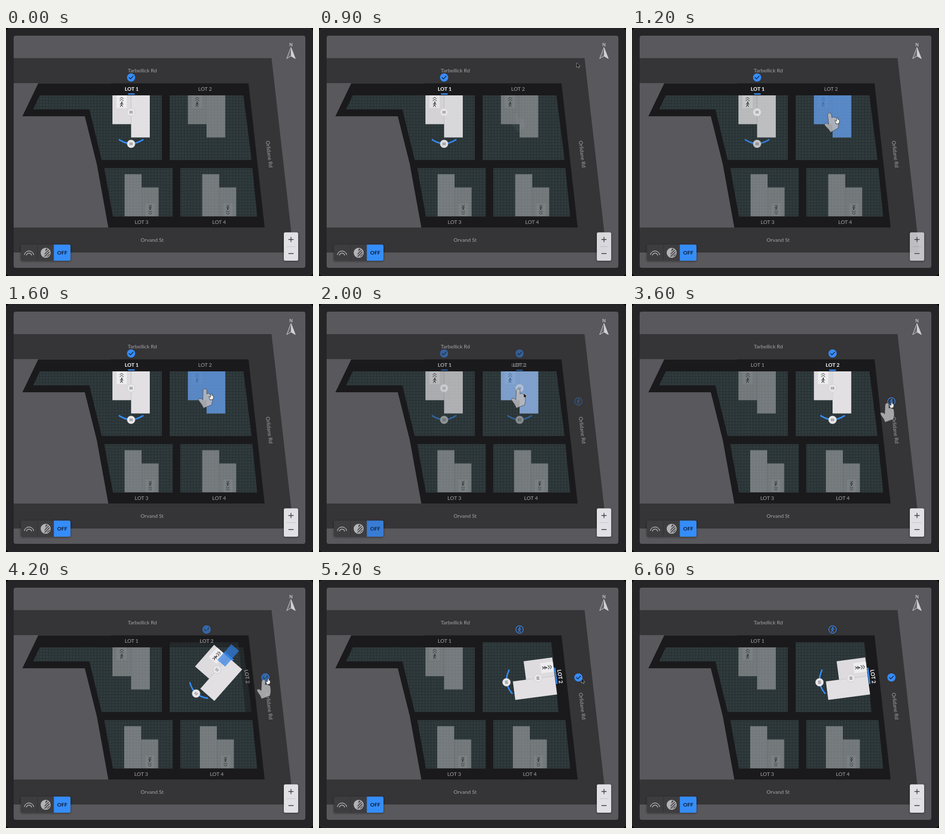
Animation, 600 px wide and 486 px high, one loop 6.7 s. Source, as an HTML page:

```html
<!DOCTYPE html>
<html lang="en">
<head>
<meta charset="utf-8">
<title>Lot planner</title>
<style>
html, body { margin: 0; width: 100%; height: 100%; overflow: hidden; background: #000; }
svg { display: block; }
text { font: 500 10.2px Lato, sans-serif; text-anchor: middle; fill: #9b9a9d; }
.on { fill: #fff; font-weight: 700; }
.lot { fill: url(#grid); }
.line { fill: none; stroke: currentColor; stroke-linecap: round; stroke-linejoin: round; }
</style>
</head>
<body>
<svg width="600" height="486" viewBox="0 0 600 486">
<defs>
  <pattern id="grid" width="5.9" height="5.9" patternUnits="userSpaceOnUse">
    <path d="M0 0H6V6H0Z" fill="#303b3d"/>
    <path d="M0 .5H6M.5 0V6" stroke="#252e30"/>
  </pattern>
  <clipPath id="disc"><circle r="9"/></clipPath>
  <filter id="soft" x="-20%" y="-20%" width="140%" height="150%">
    <feDropShadow dx="0" dy="1" stdDeviation="2" flood-opacity=".45"/>
  </filter>

  <g id="walker">
    <circle cx=".4" cy="-4" r="1.3" fill="currentColor"/>
    <path class="line" stroke-width="1.1" d="M.2-2L-.3 1L2 4.5M-.3 1L-2.6 4.5M-2.8 0L-1.5-1.8L.6-1.8L2.8 0"/>
  </g>

  <!-- origin: middle of the front edge -->
  <g id="house">
    <path d="M-36.5 0H0V56.4H-36.5Z" fill="#dddbde"/>
    <path d="M0 0H36.5V82.4H0Z" fill="#e2e0e3"/>
    <path d="M-28.5 0H-8.5V25H-28.5Z" fill="#edecee"/>
    <path d="M0 0V56" stroke="#c9c7ca" stroke-width=".7"/>
    <g color="#29292b">
      <use href="#walker" x="-18.5" y="17.5"/>
      <path class="line" d="M-22 6.5l3.5-2.7l3.5 2.7m-7 4l3.5-2.7l3.5 2.7"/>
    </g>
  </g>

  <g id="knob">
    <circle r="7.8" fill="#e9e8eb" stroke="#c2c0c4" stroke-width=".6"/>
    <path d="M-2.3-2.7V2.7M0-2.7V2.7M2.3-2.7V2.7" stroke="#59585b" stroke-width=".9"/>
  </g>
  <g id="controls">
    <use href="#knob" y="33"/>
    <path class="line" color="#368dfa" stroke-width="2.8" d="M-23 87Q0 102 23 87"/>
    <use href="#knob" y="95"/>
  </g>

  <g id="check">
    <circle r="8" fill="#368dfa"/>
    <path class="line" color="#10233f" stroke-width="1.4" d="M-4 0L-1.2 2.8L4-2.8"/>
  </g>
  <g id="ring" color="#368dfa">
    <circle r="7.3" class="line" stroke-width="1.3"/>
    <use href="#walker" transform="translate(0 .2)"/>
  </g>

  <path id="handShape" d="M-4 1Q0-4 3 0Q4 3 2 9Q6 7 8 11Q12 11 11 17Q11 25 7 32L-10 35Q-11 28-15 21Q-18 14-13 15Q-9 16-8 19Z"/>
</defs>

<rect width="600" height="486" rx="7" fill="#252427"/>
<rect x="15" y="15" width="570" height="455" rx="4" fill="#59585c"/>
<path fill="#353437" d="M15 59H519L562 440H15Z"/>
<path fill="#59585c" d="M15 108H205V391H15Z"/>
<path fill="#1a191b" d="M63 108.5H474L505.5 391H200L177.5 267L154 173H32Z"/>

<path class="lot" d="M66 132H304.5V258.5H187L163 159.5H53Z"/>
<path class="lot" d="M320 132H455L468 258.5H320Z"/>
<path class="lot" id="wide" d="M320 132H464L480 258.5H320Z"/>
<path class="lot" id="tall" d="M320 122H454L468 258.5H320Z"/>
<path class="lot" d="M192 274.5H326V369.5H209Z"/>
<path class="lot" d="M340.5 274.5H481.5L491 369.5H340.5Z"/>

<text x="266.5" y="87">Tarbellick Rd</text>
<text x="285.5" y="419">Orvand St</text>
<text transform="translate(511 247.5) rotate(83)">Orlidane Rd</text>

<use href="#house" id="house1" x="244.5" y="132"/>
<g id="active1">
  <path fill="#368dfa" d="M238.5 128h13v2.5h-13Z"/>
  <use href="#controls" id="controls1" x="244.5" y="132"/>
  <use href="#check" x="244.5" y="97"/>
</g>
<text x="245.5" y="123" id="off1">LOT 1</text>
<text x="245.5" y="123" id="on1" class="on">LOT 1</text>

<g id="lot3"><use href="#house" transform="translate(265 369) scale(-.91 -1)" opacity=".4"/>
  <text x="265" y="383.5">LOT 3</text></g>
<g id="lot4"><use href="#house" transform="translate(416.7 369) scale(-.91 -1)" opacity=".4"/>
  <text x="416.5" y="383.5">LOT 4</text></g>

<text x="389" y="123" id="off2">LOT 2</text>
<text x="392" y="123" id="on2" class="on">LOT 2</text>
<text transform="translate(467.5 189.5) rotate(83)" id="side2" class="on">LOT 2</text>
<g id="lot2">
  <use href="#house" id="house2"/>
  <path id="hover" fill="#4791f5" d="M-36.5 0H36.5V82.4H0V56.4H-36.5Z"/>
  <g id="active2">
    <rect id="bar" y="-3.5" height="2.7" fill="#368dfa"/>
    <rect id="slot" x="-12" y="-23" width="20" height="41" fill="#2f7fe6"/>
    <use href="#controls"/>
  </g>
</g>
<use href="#check" id="checkN" x="392" y="97"/>
<use href="#ring" id="ringN" x="392" y="97"/>
<use href="#check" id="checkE" x="507" y="191"/>
<use href="#ring" id="ringE" x="507" y="191"/>

<text x="557" y="35.5" style="font-size:8.5px;font-weight:700;fill:#c9c8cb">N</text>
<path d="M557 38L565.5 60L557 55L548.5 60Z" fill="#6a696d" stroke="#d2d1d4"/>
<path d="M557 38L565.5 60L557 55Z" fill="#d2d1d4"/>

<g filter="url(#soft)">
  <rect x="29" y="424.5" width="97" height="31.5" rx="3" fill="#3d3c40"/>
  <path d="M61.5 425v31" stroke="#333236"/>
  <g id="offBtn">
    <path d="M93.5 424.5h29.5a3 3 0 0 1 3 3v25.5a3 3 0 0 1-3 3h-29.5Z" fill="#368dfa"/>
    <text x="110" y="444" style="font-weight:700;fill:#0d1d36">OFF</text>
  </g>
</g>
<g class="line" color="#b3b2b5" stroke-width="1.5">
  <path d="M36 444A9.3 9.3 0 0 1 54 444M40 445A5.2 5.2 0 0 1 50 445"/>
  <g transform="translate(77.5 440.5)">
    <circle r="9"/>
    <g clip-path="url(#disc)">
      <path d="M-10-10H1L-4 10H-10Z" fill="#b3b2b5" stroke="none"/>
      <path stroke-width="1.8" d="M-10 8L8-10M-8 11L11-8M-4 12L12-4M0 13L13 0"/>
    </g>
  </g>
</g>
<g id="zoom" filter="url(#soft)">
  <rect x="543" y="400.5" width="28" height="55.5" rx="3" fill="#e1e0e4"/>
  <path d="M548 428.5h18" stroke="#bdbcc0" stroke-width=".8"/>
  <path d="M552 414.5h10M557 409.5v10M552 442h10" stroke="#3b3a3d" stroke-width="1.4"/>
</g>

<use href="#handShape" id="hand" fill="#b9b9bc" stroke="#3c3d40" stroke-width=".8"/>
<g id="cursor">
  <path id="arrow" d="M0 0V9L2.2 7L3.8 10.2L5.2 9.5L3.8 6.4H6.6Z" fill="#0b0b0c" stroke="#d8d8da" stroke-width=".6"/>
  <use href="#handShape" id="point" transform="translate(2 1.5) scale(.33)" fill="#eee" stroke="#222" stroke-width="2.5"/>
</g>
</svg>

<script>
const LOOP = 6700, STEP = 100;
const el = id => document.getElementById(id);
const fade = (id, v) => el(id).setAttribute('opacity', v);
const move = (id, v) => el(id).setAttribute('transform', v);
const mix = (a, b, k) => a + (b - a) * k;

function draw(t) {
  const ramp = (a, b) => {
    const k = Math.min(1, Math.max(0, (t - a) / (b - a)));
    return k * k * (3 - 2 * k);
  };
  const pulse = (a, b, c, d) => ramp(a, b) * (1 - ramp(c, d));
  const pick = ramp(1700, 2320), turn = ramp(3900, 4500);

  // first lot hands over to the second
  const dim = 1 - .2 * pulse(800, 1100, 1300, 1600);
  fade('house1', mix(1, .4, pick) * dim);
  fade('controls1', dim);
  fade('active1', 1 - pick);
  fade('on1', 1 - pick);
  fade('off1', pick);
  fade('zoom', dim);
  fade('offBtn', 1 - .8 * pick * (1 - pick));
  move('lot3', `translate(${-.8 * pick})`);
  move('lot4', `translate(${-4.6 * pick})`);

  // second lot turns to the side street
  move('lot2', `translate(${mix(392, 413, turn)} ${mix(180, 194.3, turn)}) rotate(${82.5 * turn}) translate(0 -48)`);
  fade('house2', mix(.4, 1, pick));
  fade('hover', .6 * pulse(900, 1150, 1750, 2450));
  fade('active2', pick);
  fade('slot', 2.8 * turn * (1 - turn));
  const half = mix(6.5, 16, turn);
  el('bar').setAttribute('x', -half);
  el('bar').setAttribute('width', 2 * half);
  fade('wide', 1 - turn);
  fade('tall', turn);
  fade('off2', 1 - pick);
  fade('on2', pick * (1 - turn));
  fade('side2', turn);
  fade('checkN', pick * (1 - turn));
  fade('ringN', turn);
  fade('checkE', turn);
  fade('ringE', pick * (1 - turn));

  // pointer and tapping hand
  const go = ramp(2900, 3700), enter = ramp(800, 1100), leave = ramp(5200, 5600);
  const x = mix(mix(mix(540, 400, enter), 511, go), 513, ramp(4600, 4900));
  const y = mix(mix(mix(31, 175, enter), 192, go), 193, ramp(4600, 4900));
  move('cursor', `translate(${mix(x, 540, leave)} ${mix(y, 31, leave)})`);
  fade('cursor', pulse(700, 900, 5600, 6100));
  const over = (t >= 1100 && t < 1900) || (t >= 3600 && t < 4400);
  fade('arrow', over ? 0 : 1);
  fade('point', over ? 1 : 0);

  const tilt = mix(-20, -10, ramp(1300, 1700));
  move('hand', `translate(${mix(393, 507, go)} ${mix(168, 197, go)}) rotate(${tilt} -3 21)`);
  fade('hand', .85 * (pulse(850, 1150, 2000, 2600) + pulse(2900, 3300, 4200, 4600)));
}

function frame(now) {
  draw(Math.floor(now % LOOP / STEP) * STEP);
  requestAnimationFrame(frame);
}
draw(0);
requestAnimationFrame(frame);
</script>
</body>
</html>
```
